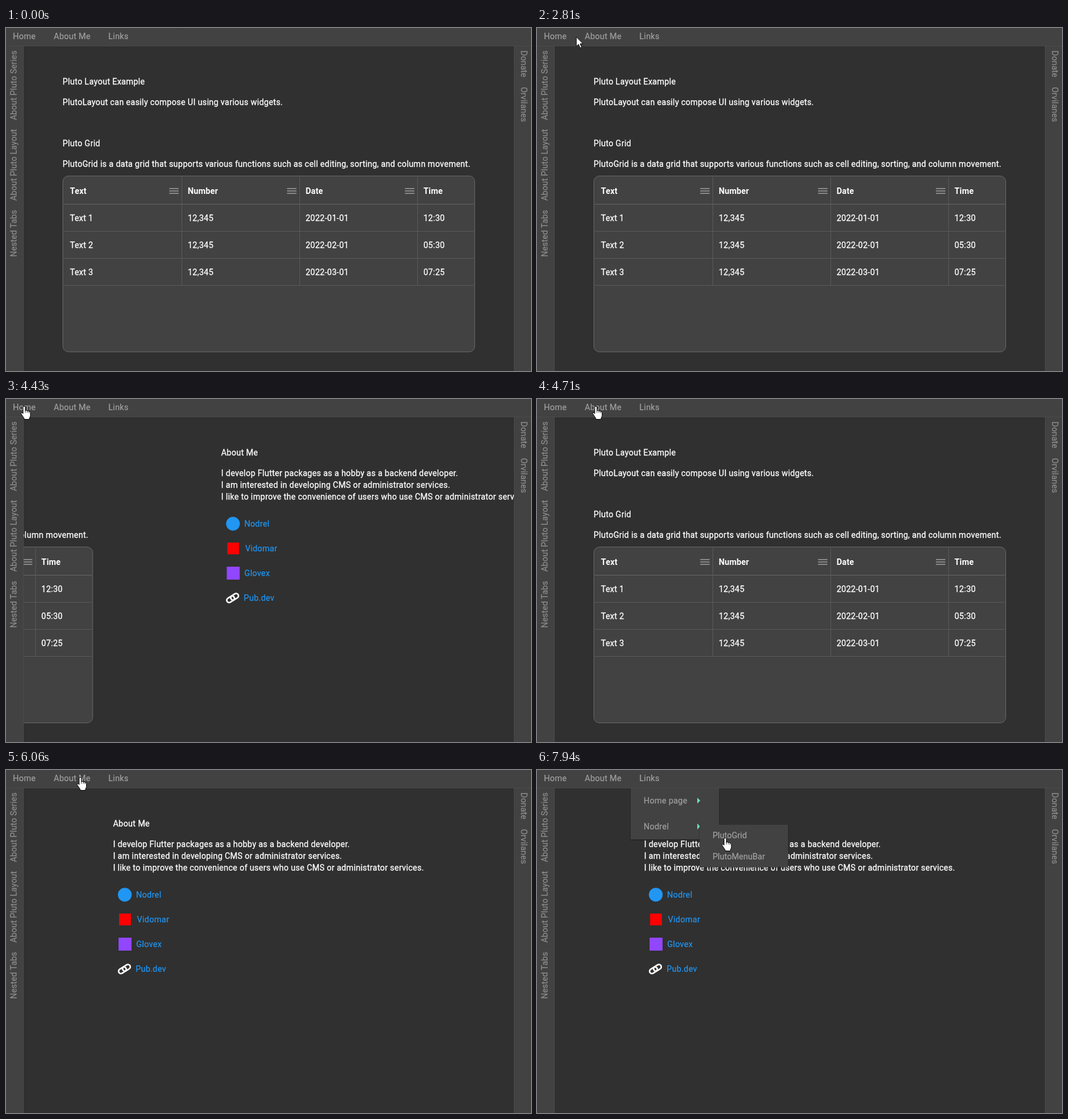
Animation, 891 px wide and 583 px high, one loop 8000 ms. Source, as an HTML page:

```html
<!DOCTYPE html>
<html lang="en">
<head>
<meta charset="utf-8">
<title>Layout demo</title>
<style>
  html, body { margin: 0; width: 100%; height: 100%; overflow: hidden; background: #303030; }
  svg { display: block; width: 891px; height: 583px; }
  text {
    font: 400 14px Roboto, sans-serif; letter-spacing: .25px; white-space: pre;
    color: #fff; fill: currentColor; stroke: currentColor; stroke-width: .3px;
  }
  .head { font-weight: 600; letter-spacing: .15px; stroke: none; }
  .bar { color: #a0a0a0; letter-spacing: .25px; stroke-width: .2px; }
  .sub { color: #a0a0a0; letter-spacing: .03px; stroke-width: .2px; }
  .side { color: #8e8e8e; letter-spacing: .18px; stroke-width: .2px; }
  .link { color: #2196f3; stroke-width: .2px; }
</style>
</head>
<body>
<svg id="stage" viewBox="0 0 891 583" xmlns="http://www.w3.org/2000/svg">
  <defs>
    <clipPath id="body"><rect x="30" y="31" width="832" height="552"/></clipPath>
    <clipPath id="top"><rect width="891" height="30"/></clipPath>
    <filter id="shade" x="-10%" y="-10%" width="120%" height="125%">
      <feDropShadow dx="0" dy="1" stdDeviation="1.3" flood-color="#000" flood-opacity=".45"/>
    </filter>
  </defs>
  <rect width="891" height="583" fill="#303030"/>
  <g clip-path="url(#body)">
    <g id="home"></g>
    <g id="about"></g>
  </g>
  <g id="frame"></g>
  <g clip-path="url(#top)"><circle id="ripple" r="12" fill="#fff" fill-opacity=".05"/></g>
  <g id="menu"></g>
  <g id="submenu"></g>
  <g id="arrow" fill="#fff" stroke="#000" stroke-linejoin="round">
    <path d="M0 0V16l3.7-3.5 2.6 6 2.7-1.1-2.6-5.8h5z"/>
  </g>
  <g id="hand" fill="#fff" stroke="#000" stroke-linejoin="round">
    <path d="M-2 1.8a1.9 1.9 0 0 1 3.8 0V7.5c.5-.9 3-.9 3.3.6.8-.8 2.7-.4 2.9.9.9-.6 2.4 0 2.4 1.4V15c0 3-1.6 3.8-1.6 5.5V22H-.2v-1.6C-1.6 18-3.4 15.6-5 13c-.9-1.6.6-2.9 1.8-2l1.2 1.3z"/>
    <path d="M1.8 7.5V11M5.1 8.2V11M8 9.2V11.5" stroke-width=".8"/>
  </g>
</svg>
<script>
const LOOP = 8000, PAGE = 832, TICK = 10;
const $ = id => document.getElementById(id);

const text = (x, y, s, cls = '') => `<text x="${x}" y="${y}" class="${cls}">${s}</text>`;
const rect = (x, y, w, h, fill, more = '') =>
  `<rect x="${x}" y="${y}" width="${w}" height="${h}" fill="${fill}" ${more}/>`;
const turned = (x, y, deg, s) =>
  `<text class="side" transform="translate(${x} ${y}) rotate(${deg})">${s}</text>`;

function homePage() {
  const cols = [
    ['Text', 'Text 1', 'Text 2', 'Text 3'],
    ['Number', '12,345', '12,345', '12,345'],
    ['Date', '2022-01-01', '2022-02-01', '2022-03-01'],
    ['Time', '12:30', '05:30', '07:25']
  ];
  let out = text(96, 96, 'Pluto Layout Example')
    + text(96, 131, 'PlutoLayout can easily compose UI using various widgets.')
    + text(96, 201, 'Pluto Grid')
    + text(96, 236, 'PlutoGrid is a data grid that supports various functions such as cell editing, sorting, and column movement.')
    + rect(96.5, 251.5, 699, 299, '#424242', 'rx="9.5" stroke="#686868"');
  for (let r = 0; r < 4; r++) out += rect(98, 299 + 46 * r, 696, 1, r ? '#5a5a5a' : '#666');
  cols.forEach((col, c) => {
    const x = 108 + 200 * c;
    col.forEach((s, r) => out += text(x + .5, 282 + 46 * r, s, r ? '' : 'head'));
    if (c == 3) return;
    out += rect(x + 190, 253, 1, 185, '#5a5a5a');
    for (let i = 0; i < 3; i++) out += rect(x + 169, 272 + 4.1 * i, 16, 1.8, '#8e8e8e');
  });
  return out;
}

function aboutPage() {
  const x = 181.65;
  const ring = dx => `<rect x="${dx - 7}" y="-4" width="14" height="8" rx="4"/>`;
  return text(x, 96, 'About Me')
    + text(x, 131, 'I develop Flutter packages as a hobby as a backend developer.')
    + text(x, 151, 'I am interested in developing CMS or administrator services.')
    + text(x, 171, 'I like to improve the convenience of users who use CMS or administrator services.')
    + '<circle cx="201.6" cy="212" r="11.7" fill="#2196f3"/>'
    + rect(192, 244, 20, 20, '#f00')
    + rect(191, 285, 22, 22, '#9146ff')
    + `<g transform="translate(201 338.3) rotate(-32)" fill="none" stroke="#fff" stroke-width="2.6">${ring(-4)}${ring(4)}</g>`
    + text(220.8, 217, 'Nodrel', 'link')
    + text(222.3, 259, 'Vidomar', 'link')
    + text(221, 301, 'Glovex', 'link')
    + text(220, 343, 'Pub.dev', 'link');
}

function frameBars() {
  return rect(0, 0, 891, 30, '#424242')
    + rect(0, 31, 30, 552, '#424242') + rect(862, 31, 29, 552, '#424242')
    + rect(0, 30, 891, 1, '#4a4a4a')
    + rect(29, 31, 1, 552, '#4a4a4a') + rect(862, 31, 1, 552, '#4a4a4a')
    + text(11.7, 19, 'Home', 'bar') + text(81, 19, 'About Me', 'bar') + text(173.7, 19, 'Links', 'bar')
    + turned(18, 156.5, -90, 'About Pluto Series')
    + turned(18, 293.5, -90, 'About Pluto Layout')
    + turned(18, 389, -90, 'Nested Tabs')
    + turned(874, 38.3, 90, 'Donate')
    + turned(874, 100.2, 90, 'Orvilanes');
}

const more = y => `<path d="M272 ${y - 5}l5 5-5 5z" fill="#69dfbd"/>`;

$('home').innerHTML = homePage();
$('about').innerHTML = aboutPage();
$('frame').innerHTML = frameBars();
$('menu').innerHTML = rect(159, 31, 150, 87, '#424242', 'filter="url(#shade)"')
  + text(181, 57, 'Home page', 'bar') + text(181, 101, 'Nodrel', 'bar') + more(52) + more(96);
$('submenu').innerHTML = rect(276, 49, 150, 72, '#424242', 'filter="url(#shade)"')
  + text(298, 72, 'PlutoGrid', 'sub') + text(298, 108, 'PlutoMenuBar', 'sub');

// pointer path: time, x, y
const path = [
  [0, 289, -17], [30, 289, -17], [260, 294, 70], [520, 280, 165], [850, 252, 138],
  [920, 252, 138], [1400, 51.5, 34.5], [1750, 33, 17],
  [2480, 33, 17], [2610, 61, 16], [2750, 61, 16], [2950, 88, 12.5],
  [3970, 88, 12.5], [4170, 31, 12.5], [4520, 31, 12.5], [4780, 115, 12.5], [4850, 116.5, 12.5],
  [6000, 116.5, 12.5], [6240, 178, 12.5], [6540, 178, 12.5], [6800, 207.5, 52.5],
  [6950, 207.5, 52.5], [7210, 334, 66], [7350, 334, 66], [7610, 224, 98],
  [7810, 224, 98], [7940, 319.5, 115.5], [LOOP, 319.5, 115.5]
];
const clicks = [[1880, 33, 17], [3360, 88, 12.5], [4270, 31, 12.5], [5180, 116.5, 12.5]];
const slides = [[3460, 0, 1], [4380, 1, 0], [5333, 0, 1]];

const clamp = v => Math.min(1, Math.max(0, v));
const smooth = k => k * k * (3 - 2 * k);

// cubic-bezier(.25, .1, .25, 1)
function ease(x) {
  let lo = 0, hi = 1;
  for (let i = 0; i < 24; i++) {
    const u = (lo + hi) / 2;
    if (.75 * u * (1 - u) + u ** 3 < x) lo = u; else hi = u;
  }
  return .3 * lo * (1 - lo) ** 2 + 3 * lo * lo * (1 - lo) + lo ** 3;
}

function pointer(t) {
  const i = path.findIndex((p, n) => n && t <= p[0]);
  const [t0, x0, y0] = path[i - 1], [t1, x1, y1] = path[i];
  const k = smooth((t - t0) / (t1 - t0));
  return [x0 + (x1 - x0) * k, y0 + (y1 - y0) * k];
}

function scroll(t) {
  let at = 0;
  for (const [start, from, to] of slides)
    if (t >= start) at = from + (to - from) * ease(clamp((t - start) / 300));
  return at * PAGE;
}

const show = (id, on) => $(id).setAttribute('visibility', on ? 'visible' : 'hidden');
const move = (id, x, y) => $(id).setAttribute('transform', `translate(${x} ${y})`);

function draw(t) {
  const s = scroll(t);
  move('home', -s, 0);
  move('about', PAGE - s, 0);

  const click = clicks.find(c => t >= c[0] && t < c[0] + 130);
  show('ripple', click);
  if (click) move('ripple', click[1], click[2]);

  const second = t >= 7530, open = t >= 6730;
  show('menu', t >= 6190);
  show('submenu', open);
  move('submenu', 0, second ? 44 : 0);

  const [x, y] = pointer(t);
  const onBar = y > 0 && y < 30 && Math.abs(x - 63) > 4;
  const subTop = second ? 93 : 49;
  const onSub = open && x > 276 && y > subTop && y < subTop + 72;
  const hand = t > 900 && (onBar || onSub);
  show('hand', hand);
  show('arrow', !hand);
  move(hand ? 'hand' : 'arrow', x, y);
}

// time advances in whole ticks, with 2 ms of slack for timer jitter
const begin = performance.now();
function tick() {
  const t = performance.now() - begin + 2;
  draw(Math.floor(t / TICK) * TICK % LOOP);
  requestAnimationFrame(tick);
}
draw(0);
requestAnimationFrame(tick);
</script>
</body>
</html>
```
